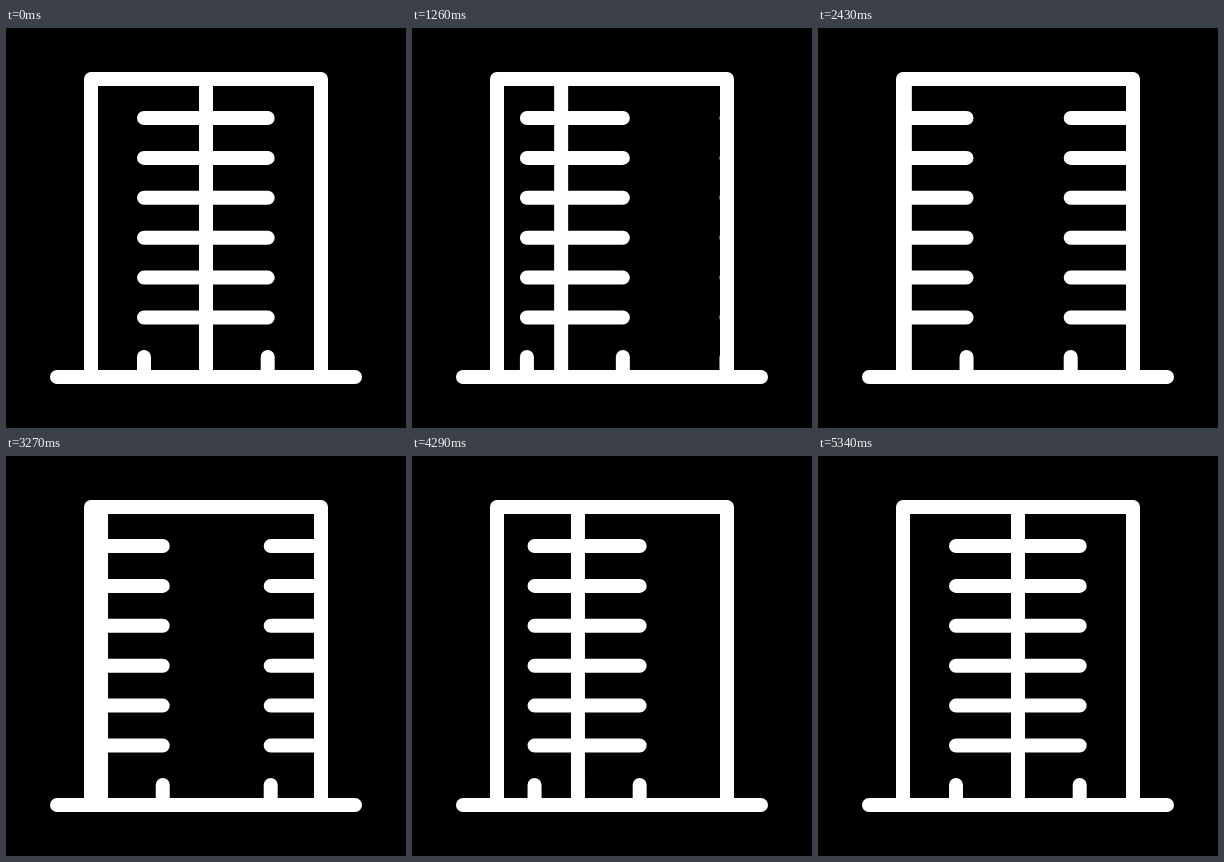
Recreate the animation shown at these times as an HTML page. Size 400 by 400 pixels, loop 5400 ms.

```html
<!DOCTYPE html>
<html>
<head>
<meta charset="utf-8">
<title>Turning tower</title>
<style>
  html, body { margin: 0; width: 100%; height: 100%; overflow: hidden; background: #000; }
  svg { display: block; width: 100%; height: 100%; }
  path { fill: none; stroke: #fff; stroke-width: 14; stroke-linecap: round; stroke-linejoin: round; }
</style>
</head>
<body>
<svg viewBox="0 0 400 400">
  <path d="M51 349H349M85 349V51H315V349"/>
  <path id="faces"/>
</svg>
<script>
const LOOP = 5400, HALF = 2670, STEP = 30;
const LEFT = 85, RIGHT = 315, TOP = 51, GROUND = 349;
const faces = document.getElementById('faces');
const floors = [0, 1, 2, 3, 4, 5].map(i => 90 + 39.9 * i);

// cubic-bezier(.5, 0, .5, 1)
function ease(x) {
  let lo = 0, hi = 1;
  for (let i = 0; i < 24; i++) {
    const s = (lo + hi) / 2;
    if (1.5 * s * (1 - s) + s ** 3 < x) lo = s; else hi = s;
  }
  return lo * lo * (3 - 2 * lo);
}

const door = x => `M${x} 329V${GROUND}`;
const windows = (a, b) => floors.map(y => `M${a} ${y}H${b}`).join('');

function draw(t) {
  const left = Math.min(Math.abs(HALF - t), HALF); // time to the far end of the swing
  const turn = ease(1 - left / HALF);
  const corner = 200 - 114.5 * turn;
  const a = 138 - 52 * turn;
  const b = corner + 61.7;
  const c = Math.min(RIGHT, 249.5 + 65 * (left / 1410) ** 1.7);
  faces.setAttribute('d',
    `M${corner} ${TOP}V${GROUND}` +
    windows(Math.max(a, LEFT), b) + windows(c, RIGHT) +
    door(a) + door(b) + door(c));
}

const start = performance.now();
function tick() {
  const t = (performance.now() - start) % LOOP;
  draw(Math.floor(t / STEP) * STEP);
  requestAnimationFrame(tick);
}
tick();
</script>
</body>
</html>
```
